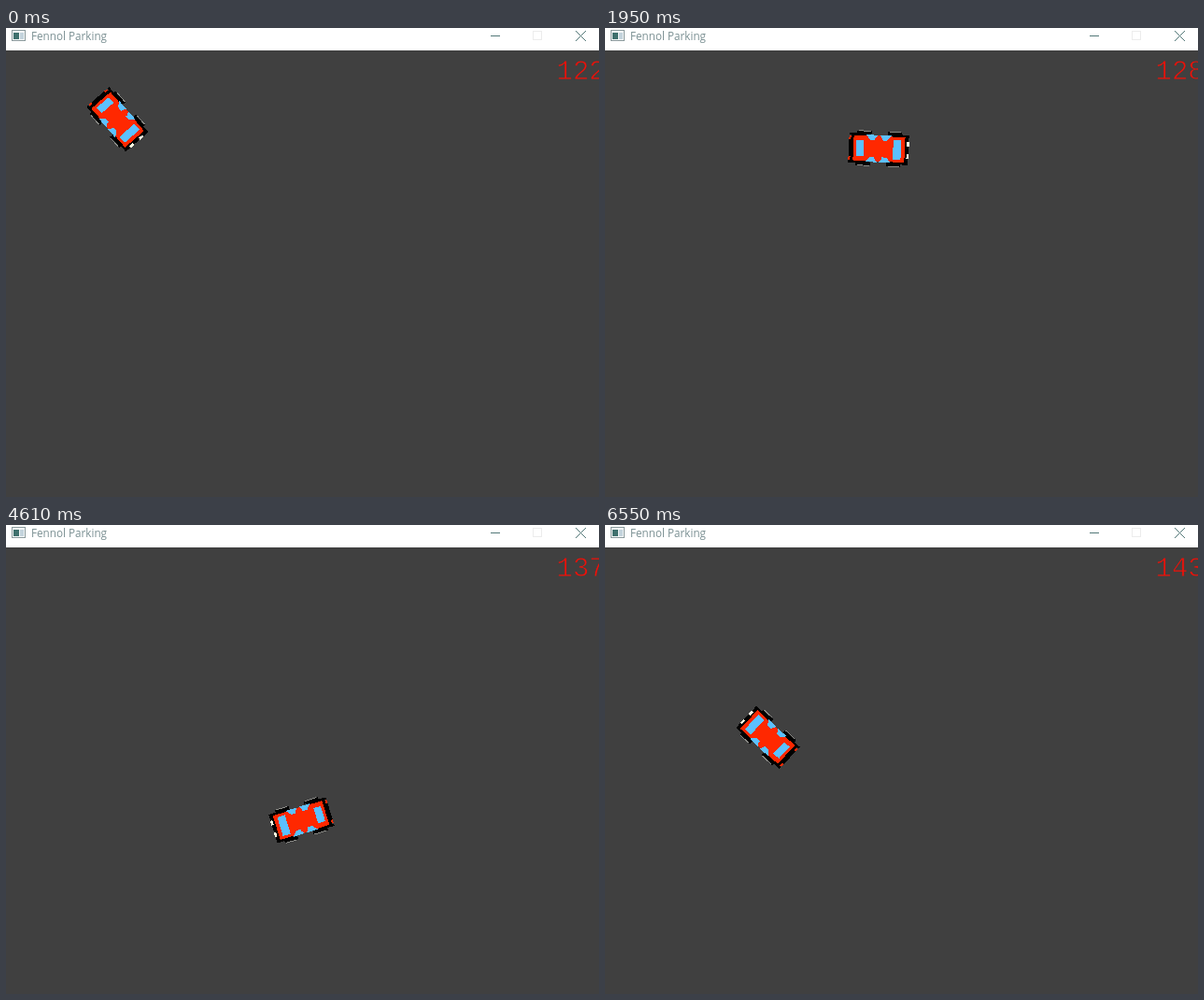
These frames come from a looping animation (635x502 px, 6610 ms). An HTML page:

```html
<!DOCTYPE html>
<html lang="en">
<head>
<meta charset="utf-8">
<title>Fennol Parking</title>
<style>
  html, body { margin: 0; width: 100%; height: 100%; overflow: hidden; background: #404040; }
  svg { display: block; width: 635px; height: 502px; }
  .title { font: 11.7px "Open Sans", "Noto Sans", sans-serif; fill: #7b9093; }
  /* A stroke in the ground colour thins the digits. */
  .fps { font: 29px "Liberation Mono", monospace; fill: #f01008; stroke: #404040; stroke-width: .8; }
</style>
</head>
<body>
<svg viewBox="0 0 635 502">
  <defs>
    <g id="half">
      <path fill="#ff2800" d="M-28-14H29V.5H-28zM-32-13h3v4h-3z"/>
      <path fill="#000" d="M-32-16H-9v2.5H-32zM9-16H32v2.5H9zM-24-18.5H-8v3H-24zM9-18.5H24v3H9z"/>
      <path fill="#000" d="M-30-14h3V.5h-3zM-32-9h3V.5h-3zM28-14h2.5V.5H28zM30-14h2v5h-2zM30-4h2V.5h-2z"/>
      <path fill="#8a8a86" d="M-22-19h13v1h-13zM11-19h12v1H11z"/>
      <path fill="#5cc0ff" d="M-24-8.5h8V.5h-8zM15.5-10.5H24V.5H15.5z"/>
      <path fill="#5cc0ff" d="M-14-14.5H-1.5L-4-11v2h-5zM1-14.5H13.5L8.5-9h-5v-2z"/>
      <path fill="#fffbe0" d="M30-9h2.5v5H30z"/>
    </g>
  </defs>

  <rect width="635" height="502" fill="#404040"/>
  <rect width="635" height="24" fill="#fff"/>
  <g shape-rendering="crispEdges">
    <rect x="6.5" y="2.5" width="14" height="11" fill="#f4f7f7" stroke="#8b9a9d"/>
    <rect x="8" y="5" width="6" height="7" fill="#3f706d"/>
    <rect x="15" y="5" width="4" height="7" fill="#c3d3dc"/>
    <path d="M519 8.5h10" stroke="#527777"/>
    <rect x="564.5" y="3.5" width="9" height="9" fill="none" stroke="#ececec"/>
  </g>
  <path d="M610 3l11 11M621 3l-11 11" stroke="#527777"/>
  <text class="title" x="27" y="13">Fennol Parking</text>
  <text class="fps" id="fps" x="589.5" y="55"></text>

  <g id="car" shape-rendering="crispEdges">
    <use href="#half"/>
    <use href="#half" transform="scale(1 -1)"/>
  </g>
</svg>
<script>
const LOOP = 6610, STEP = 66.75, LAST_STEP = 98;
const SPEED = 0.1;                       // px per ms
const TURN = 0.06;                       // degrees per ms
const BRAKE_AT = 6200, BRAKE_TIME = 350;

const car = document.getElementById('car');
const fps = document.getElementById('fps');

const within = (t, from, to) => t >= from && t < to;

// -1 steers left, 1 steers right, 0 goes straight.
function steering(t) {
  if (within(t, 1520, 5873)) return 1;
  return within(t, 223, 1410) || within(t, BRAKE_AT, 6460) ? -1 : 0;
}

const speedAt = t => SPEED * (1 - 0.6 * Math.max(0, t - BRAKE_AT) / BRAKE_TIME);

// Drives the whole lap once, keeping the pose at each displayed step.
function drive() {
  const poses = [];
  let x = 119.3, y = 97.8, heading = 49;
  for (let t = 0; poses.length <= LAST_STEP; t++) {
    if (t >= poses.length * STEP) poses.push({ x, y, heading });
    const angle = heading * Math.PI / 180;
    x += speedAt(t) * Math.cos(angle);
    y += speedAt(t) * Math.sin(angle);
    heading += TURN * steering(t);
  }
  return poses;
}

// The frame rate drifts between levels and flickers on every third step.
const levels = [122, 147, 128, 119, 137, 130, 144, 143];
function reading(step) {
  const noise = Math.abs(Math.sin(step * 127.1 + 3) * 43758.5453) % 1;
  return step % 3 === 1 ? 115 + Math.floor(noise * 34) : levels[Math.floor(step / 14)];
}

const poses = drive();
const start = performance.now();

function draw(time) {
  const step = Math.min(LAST_STEP, Math.floor(time / STEP));
  const { x, y, heading } = poses[step];
  car.setAttribute('transform', `translate(${x} ${y}) rotate(${heading})`);
  fps.textContent = reading(step);
}

function tick() {
  draw((performance.now() - start) % LOOP);
  requestAnimationFrame(tick);
}
tick();
</script>
</body>
</html>
```
